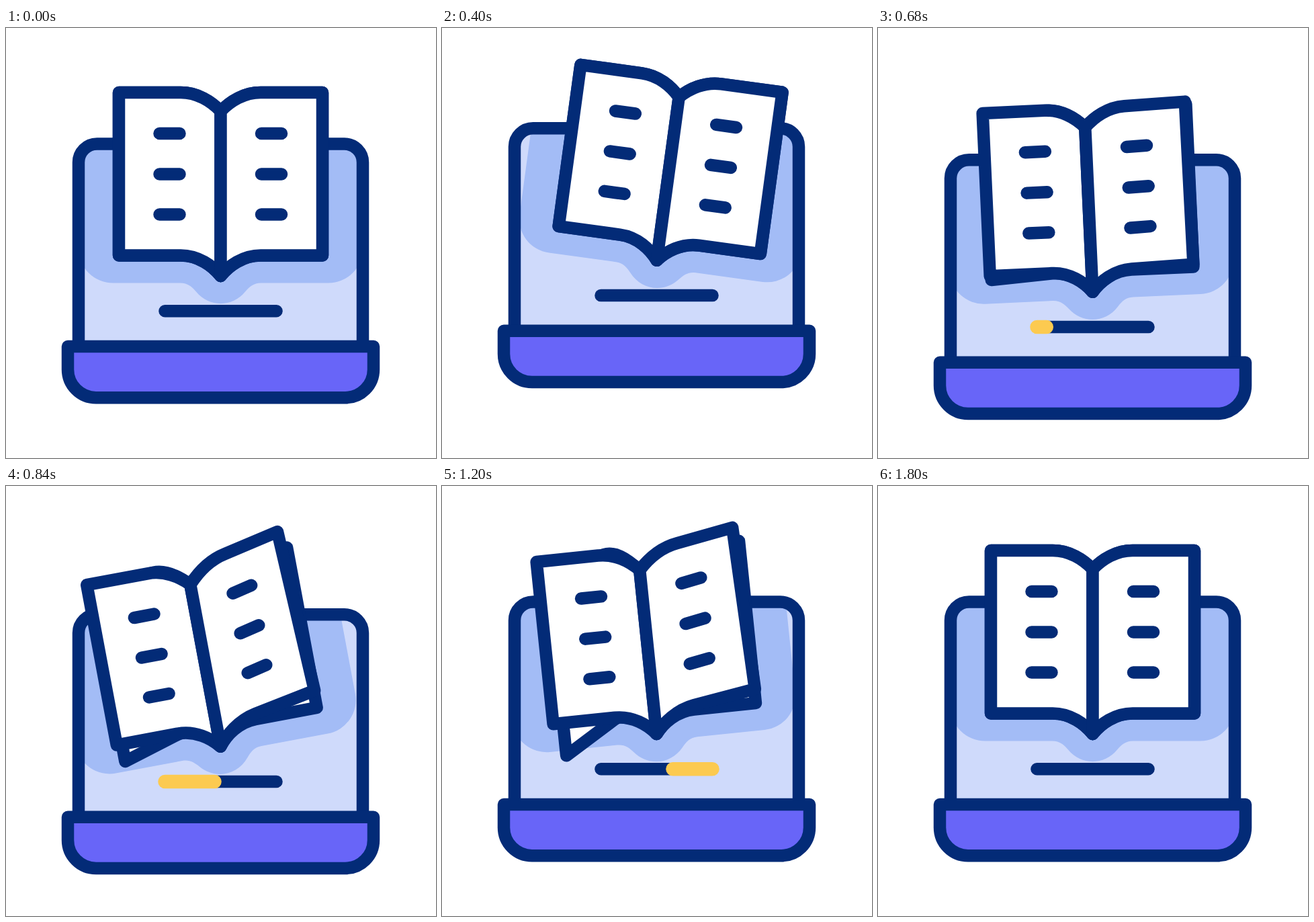
Write an HTML page that moves like this. It is 640 by 640 pixels and loops after 2040 ms.

```html
<!DOCTYPE html>
<html lang="en">
<head>
<meta charset="utf-8">
<title>Online book</title>
<style>
html, body { margin: 0; height: 100%; overflow: hidden; background: #fff; }
svg { display: block; width: 100%; height: 100%; }
.ink { stroke: #032b77; stroke-width: 18.5; stroke-linecap: round; stroke-linejoin: round; fill: none; }
.page { fill: #fff; }
</style>
</head>
<body>
<svg viewBox="0 0 640 640">
  <clipPath id="screen"><path d="M108 474V200a27.5 27.5 0 0 1 27.5-27.5h368a27.5 27.5 0 0 1 27.5 27.5v274z"/></clipPath>
  <g id="laptop">
    <g clip-path="url(#screen)">
      <path fill="#cfdafb" d="M100 160h440v320H100z"/>
      <path id="shadow" fill="#a3bcf6" d="M-211.5-330V-41.500a51 51 0 0 0 51 51H-60C-49 9.500-43 15-36.500 22.500C-17 46 17 46 36.500 22.500C43 15 49 9.500 60 9.500H160.500a51 51 0 0 0 51-51V-330z"/>
    </g>
    <path class="ink" d="M108 474V200a27.500 27.500 0 0 1 27.500-27.500h368a27.500 27.500 0 0 1 27.500 27.500v274"/>
    <path class="ink" style="fill:#6865f8" d="M92 474H547V508.200a42 42 0 0 1-42 42H134a42 42 0 0 1-42-42z"/>
    <path class="ink" d="M236.500 421.300H402.500"/>
    <path id="progress" class="ink" style="stroke:#fcca50;stroke-width:20.5"/>
  </g>
  <g id="book" class="ink">
    <path id="flap" class="page"/>
    <path id="rightBase" class="page"/>
    <path id="left" class="page"/>
    <path id="leftLines"/>
    <path id="right" class="page"/>
    <path id="rightLines"/>
  </g>
</svg>
<script>
const LOOP = 2040, STEP = 40;
const $ = id => document.getElementById(id);
const draw = (id, d) => $(id).setAttribute('d', d);
const place = (id, transform) => $(id).setAttribute('transform', transform);

// Eased value through [time, value] keys
function track(t, ...keys) {
  if (t <= keys[0][0]) return keys[0][1];
  for (let i = 1; i < keys.length; i++) {
    const [t0, a] = keys[i - 1], [t1, b] = keys[i];
    if (t < t1) return a + (b - a) * (1 - Math.cos(Math.PI * (t - t0) / (t1 - t0))) / 2;
  }
  return keys[keys.length - 1][1];
}

// Half of the book; side is -1 or 1, the outer corners shift by dy and topDx / botDx
function page(side, dy = 0, bend = 0, topDx = 0, botDx = 0) {
  const slope = (dy - bend) / 92;
  const p = (x, y) => `${side * x} ${y} `;
  const top = -274, bottom = -31.5;
  return 'M0 -246C' + p(14, -261) + p(35, top + bend - 24.5 * slope) + p(59.5, top + bend) +
    'L' + p(151.5 + topDx, top + dy) + 'L' + p(151.5 + botDx, bottom + dy) +
    'L' + p(59.5, bottom + bend) +
    'C' + p(33, bottom + bend - 26.5 * slope) + p(12, -16) + '0 -1Z';
}

// Three short text strokes, each turned about its own middle
function lines(x, y, degrees = 0) {
  const a = degrees * Math.PI / 180, dx = 15 * Math.cos(a), dy = 15 * Math.sin(a);
  return [-213, -152.5, -92.5].map(row =>
    `M${x - dx} ${y + row - dy}L${x + dx} ${y + row + dy}`).join('');
}

draw('left', page(-1));
draw('rightBase', page(1));
draw('leftLines', lines(-76, 0));

function frame(now) {
  const t = Math.floor(now % LOOP / STEP) * STEP;
  const y = track(t, [0, 0], [270, -36], [695, 24], [1160, 0]);
  const angle = track(t, [0, 0], [420, 7.8], [920, -11.8], [1480, 0]);
  const lift = track(t, [600, 0], [1020, 42], [1380, 0]);
  const drop = track(t, [560, 0], [1110, 51], [1800, 0]);
  const from = track(t, [850, 236.5], [1440, 402.5]);
  const to = track(t, [570, 236.5], [1150, 402.5]);

  place('laptop', `translate(0 ${y})`);
  place('shadow', `translate(319.5 370) rotate(${angle})`);
  place('book', `translate(319.5 ${370 + y}) rotate(${angle})`);
  draw('progress', to > from ? `M${from} 421.3H${to}` : '');
  draw('flap', page(-1, drop, drop * .05, drop * -.3, drop * -.3));
  draw('right', page(1, -lift, lift * -.3, lift * -.37, lift * .05));
  draw('rightLines', lines(75.5 - lift * .04, lift * -.47, lift * -.5));
  requestAnimationFrame(frame);
}
frame(performance.now());
</script>
</body>
</html>
```
